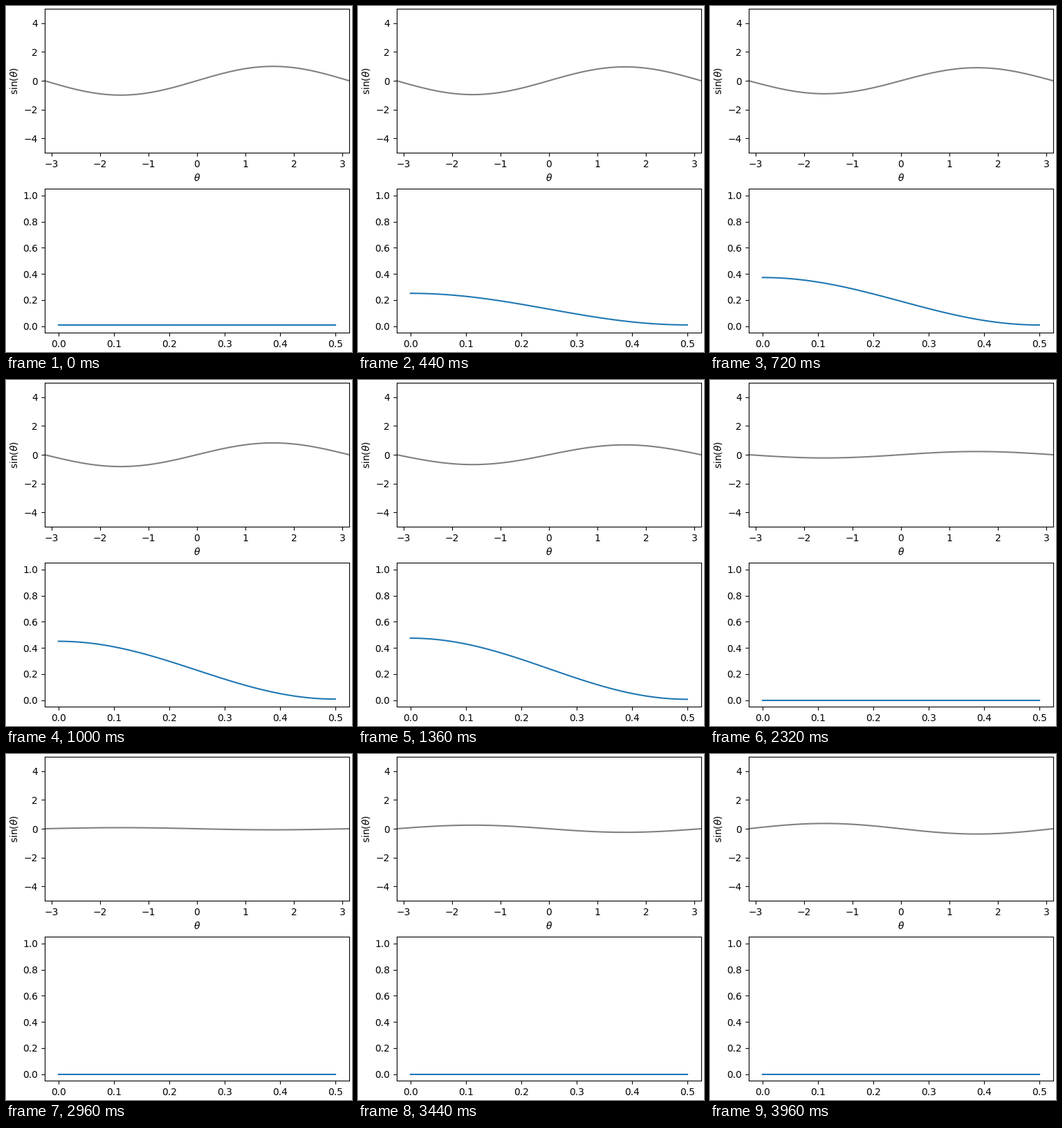
Write a matplotlib script that moves like this. It is 500 px wide and 500 px high and loops after 4 s.

```python
import numpy as np
import matplotlib.pyplot as plt
from matplotlib.animation import FuncAnimation

FRAMES = 100
STEP = 0.0345        # growth of the modulation depth per frame
CUTOFF = 36          # the lower profile collapses here

phi = (np.arange(200) + 0.5) * 2 * np.pi / 200
theta = np.linspace(-np.pi, np.pi, 100)
x = np.linspace(0, 0.5, 100)


def bessel0(k):
    return np.mean(np.cos(k * np.sin(phi)))


def profile(i, amp):
    if i >= CUTOFF:
        return np.zeros_like(x)
    height = 0.47 * np.sin(np.pi * i / 64)
    return 0.01 * amp + height * np.cos(np.pi * x) ** 2


fig, (top, low) = plt.subplots(2, figsize=(5, 5), dpi=100,
                               layout="constrained")
top.set_xlim(-np.pi, np.pi)
top.set_ylim(-5, 5)
top.set_xlabel(r"$\theta$")
top.set_ylabel(r"$\sin(\theta)$")
wave, = top.plot(theta, np.sin(theta), color="gray")

low.set_xlim(-0.025, 0.525)
low.set_ylim(-0.05, 1.05)
curve, = low.plot(x, profile(0, 1), color="C0")


def update(i):
    amp = bessel0(STEP * i)
    wave.set_ydata(amp * np.sin(theta))
    curve.set_ydata(profile(i, amp))
    return wave, curve


anim = FuncAnimation(fig, update, frames=FRAMES, interval=40,
                     init_func=lambda: update(0), repeat=True)
plt.show()
```
